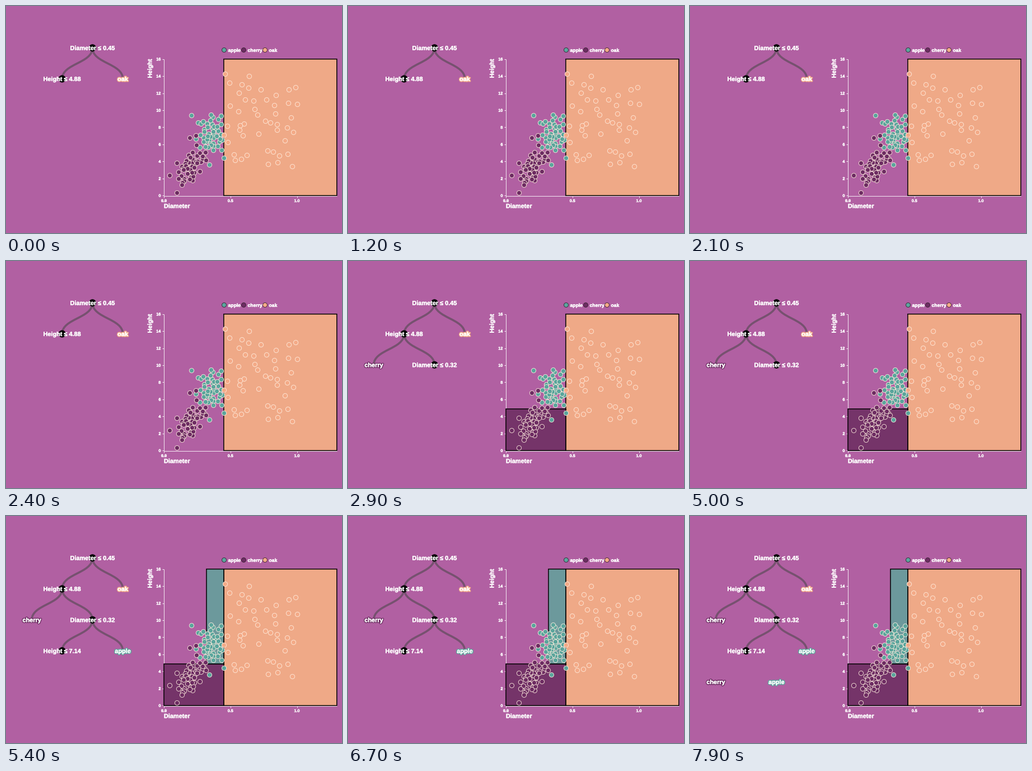
Animation of 600 by 405 pixels, one loop 8 s. Source, as a matplotlib script:

```python
import matplotlib.pyplot as plt
import matplotlib.patheffects as pe
import numpy as np
from matplotlib.animation import FuncAnimation
from matplotlib.patches import Circle, PathPatch, Rectangle
from matplotlib.path import Path

W, H, DPI = 600, 405, 72  # at 72 dpi one point is one pixel
FRAMES, INTERVAL = 80, 100
STEP, LAG = 27, 2  # frames per tree level; links follow labels by LAG

BG = "#b160a2"
LINK = "#76516f"
RING = "#ffeedfd8"
DOT = {"apple": "#5aa59c", "cherry": "#6d2c62", "oak": "#f4aa87"}
AREA = {"apple": "#6c999c", "cherry": "#753469", "oak": "#efa987"}

plt.rcParams["font.family"] = "Liberation Sans"
fig = plt.figure(figsize=(W / DPI, H / DPI), dpi=DPI, facecolor=BG)
ax = fig.add_axes([0, 0, 1, 1])
ax.set_xlim(0, W)
ax.set_ylim(H, 0)
ax.axis("off")

rng = np.random.default_rng(7)
timed = []  # (artist, first frame it is seen)


def add(artist, start=0):
    timed.append((artist, start))
    return artist


def px(diameter):
    return 282 + 237.5 * diameter


def py(height):
    return 338.2 - 15.22 * height


def label(x, y, text, size=10.9, outline=None, start=0, ha="center", **kw):
    """Bold white text whose capitals are centred on y."""
    effects = [pe.Stroke(linewidth=0.3, foreground="white"), pe.Normal()]
    if outline:
        effects.insert(0, pe.Stroke(linewidth=3.2, foreground=outline))
    kw.setdefault("va", "baseline")
    t = ax.text(x, y + 0.36 * size, text, color="white", weight="bold",
                size=size, ha=ha, path_effects=effects, zorder=9, **kw)
    return add(t, start)


def line(xs, ys):
    ax.plot(xs, ys, color="#f3e6f1", lw=1, solid_capstyle="butt", zorder=1)


def draw_axes():
    line([282, 282], [94.5, 338.5])
    line([282, 591], [338.5, 338.5])
    for v in range(0, 17, 2):
        line([278.5, 282], [py(v)] * 2)
        label(276.5, py(v), str(v), size=7.2, ha="right")
    for v in (0, 0.5, 1):
        line([px(v)] * 2, [338.5, 342])
        label(px(v), 347.3, f"{v:.1f}", size=7.2)
    label(282, 356.5, "Diameter", ha="left")
    label(257.5, 107.6, "Height", rotation=90, va="center")
    ax.plot([0, W], [H - 0.5] * 2, color="#93528a", lw=1)


def draw_legend():
    for x, kind in ((389.5, "apple"), (424.5, "cherry"), (462.5, "oak")):
        ax.add_patch(Circle((x, 78.5), 4, fc=DOT[kind], ec="#33202f",
                            lw=0.8, zorder=5))
        label(x + 7, 78.8, kind, size=8.6, ha="left")


def apple():
    return rng.normal(0.365, 0.05), rng.normal(7.4, 1.35)


def cherry():
    d = rng.normal(0.215, 0.065)
    return d, 3.4 + 11 * (d - 0.215) + rng.normal(0, 1.1)


def oak():
    return rng.uniform(0.46, 1.0), rng.uniform(3, 13.3)


def samples(kind, draw, count, gap, d_range, h_range, outliers):
    """Random dots inside the ranges, at least gap pixels apart."""
    dots = [(px(d), py(h)) for d, h in outliers]
    while len(dots) < count:
        d, h = draw()
        if not (d_range[0] < d < d_range[1] and h_range[0] < h < h_range[1]):
            continue
        x, y = px(d), py(h)
        if all(np.hypot(x - a, y - b) > gap for a, b in dots):
            dots.append((x, y))
    xs, ys = zip(*dots)
    ax.scatter(xs, ys, s=8.2 ** 2, c=DOT[kind], edgecolors=RING,
               linewidths=1, zorder=6)


def draw_samples():
    samples("apple", apple, 50, 4, (0.23, 0.47), (4.9, 9.9),
            [(0.205, 9.4), (0.34, 3.65), (0.45, 4.4)])
    samples("cherry", cherry, 50, 3, (0.08, 0.34), (1.2, 6),
            [(0.04, 2.4), (0.095, 0.35), (0.195, 6.8), (0.24, 7.05)])
    samples("oak", oak, 48, 8, (0.46, 1.0), (3, 13.3),
            [(0.46, 14.3), (0.45, 7.1), (0.64, 14), (1.0, 10.75)])


def region(kind, d0, d1, h0, h1, start):
    left, top = px(d0), py(h1)
    box = Rectangle((left, top), px(d1) - left, py(h0) - top, fc=AREA[kind],
                    ec="black", lw=1.5, snap=False, zorder=2)
    add(ax.add_patch(box), start)


def node(col, depth):
    return 46 + 54.2 * col, 74.7 + 55.3 * depth


def link(a, b, start):
    (x0, y0), (x1, y1) = a, b
    mid = (y0 + y1) / 2
    curve = Path([(x0, y0), (x0, mid), (x1, mid), (x1, y1)],
                 [Path.MOVETO] + [Path.CURVE4] * 3)
    add(ax.add_patch(PathPatch(curve, fc="none", ec=LINK, lw=3.6,
                               capstyle="butt", zorder=3)), start)


def split(col, depth, text, start=0):
    x, y = node(col, depth)
    add(ax.add_patch(Circle((x, y), 6.5, fc="black", ec="none", zorder=4)),
        start)
    label(x, y, text, start=start)


def leaf(col, depth, kind, start):
    label(*node(col, depth), kind, outline=DOT[kind], start=start)


def shown(depth):
    return STEP * depth - STEP - LAG


def draw_tree():
    # parent column, split column and rule, leaf column and kind, leaf bounds
    levels = [
        (2, 1, "Height ≤ 4.88", 3, "oak", (0.45, 1.3, 0, 16)),
        (1, 2, "Diameter ≤ 0.32", 0, "cherry", (0, 0.45, 0, 4.88)),
        (2, 1, "Height ≤ 7.14", 3, "apple", (0.32, 0.45, 4.88, 16)),
    ]
    split(2, 0, "Diameter ≤ 0.45")
    for depth, (parent, col, rule, end, kind, box) in enumerate(levels, 1):
        start = shown(depth)
        split(col, depth, rule, start)
        leaf(end, depth, kind, start)
        for child in (col, end):
            link(node(parent, depth - 1), node(child, depth), start + LAG)
        region(kind, *box, start + LAG)
    leaf(0, 4, "cherry", shown(4))
    leaf(2, 4, "apple", shown(4))


def update(frame):
    for artist, start in timed:
        artist.set_visible(frame >= start)
    return [artist for artist, _ in timed]


draw_axes()
draw_legend()
draw_samples()
draw_tree()
anim = FuncAnimation(fig, update, frames=FRAMES, interval=INTERVAL,
                     repeat=True, repeat_delay=0, blit=False)
plt.show()
```
